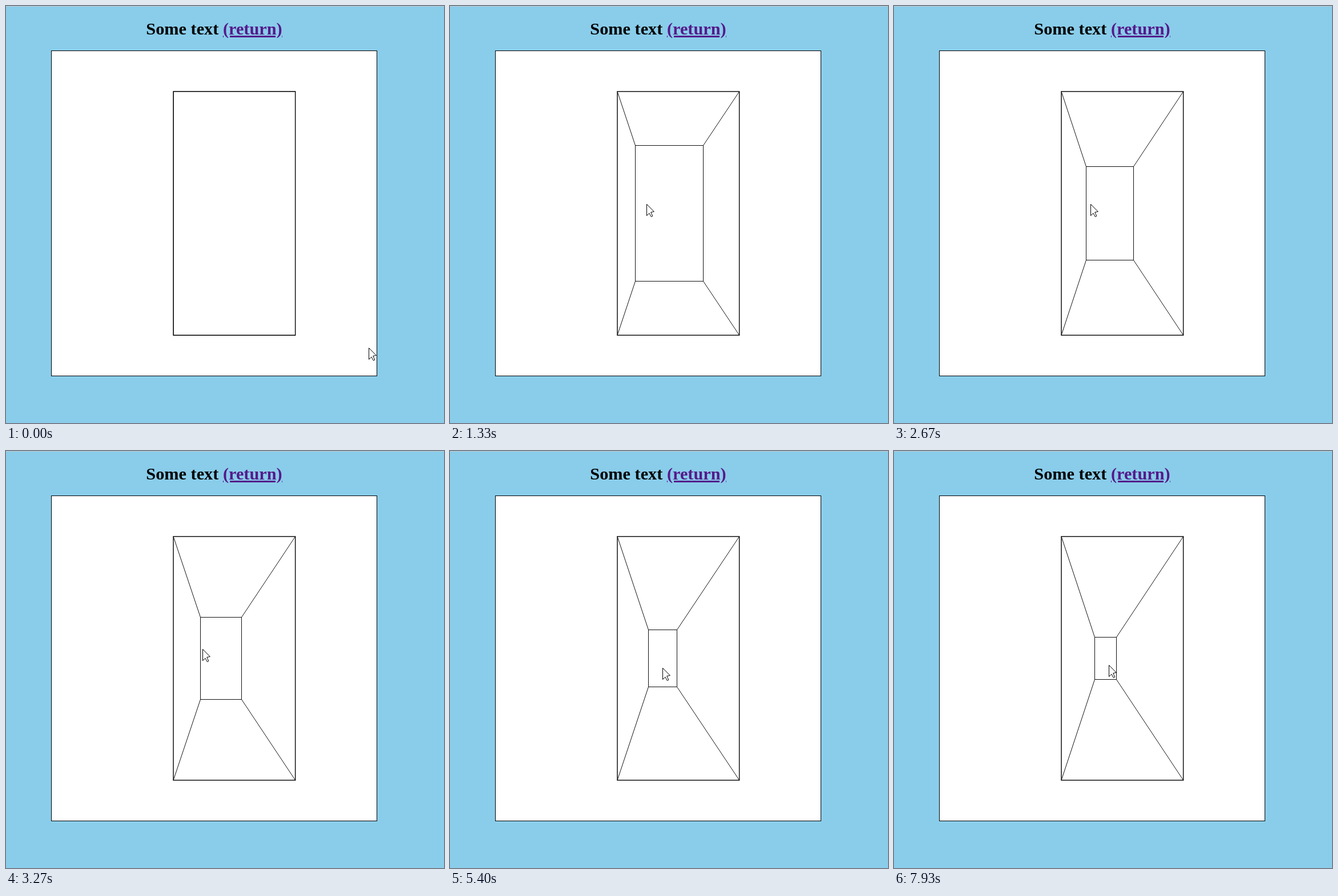
Write an HTML page with a canvas that moves like this. It is 767 px wide and 731 px high and loops after 8000 ms.

```html
<!DOCTYPE html>
<html lang="en">
<head>
<meta charset="utf-8">
<title>Tunnel</title>
<style>
  html, body { margin: 0; width: 100%; height: 100%; overflow: hidden; }
  body { position: relative; background: #89cdea; }
  body::before { content: ""; position: absolute; inset: 0 0 auto; height: 1px; background: #c3c7c9; }
  h1 {
    position: absolute; left: 79px; top: 23px; width: 571px; margin: 0;
    font: bold 30.3px "Liberation Serif", serif; text-align: center; white-space: nowrap;
  }
  h1 span { color: #551a8b; text-decoration: underline; }
  .panel {
    position: absolute; left: 79px; top: 78px; width: 571px; height: 571px;
    box-sizing: border-box; border: 1px solid #000; background: #fff;
  }
  canvas { position: absolute; left: 0; top: 0; }
</style>
</head>
<body>
<h1>Some text <span>(return)</span></h1>
<div class="panel"></div>
<canvas id="stage" width="767" height="731"></canvas>
<script>
const ctx = document.getElementById("stage").getContext("2d");
const LOOP = 8000, FPS = 15, STEPS = LOOP / 1000 * FPS;
const EYE = { x: 364.25, y: 363.5 };
const UNIT = 71.2; // the opening is 3 units wide and 6 high
const ARROW = new Path2D("M.5 .5V20.5L5 16.2 8.3 22.5 10.8 21.3 7.8 14.5 13.3 13.5Z");

// The opening as seen in perspective at a given depth.
function opening(depth) {
  const u = UNIT / depth;
  return { left: EYE.x - u, right: EYE.x + 2 * u, top: EYE.y - 3 * u, bottom: EYE.y + 3 * u };
}

function snap(box) {
  return Object.fromEntries(Object.entries(box).map(([k, v]) => [k, Math.floor(v) + 0.5]));
}

function strokeBox(box, width) {
  ctx.lineWidth = width;
  ctx.strokeRect(box.left, box.top, box.right - box.left, box.bottom - box.top);
}

// Smooth progress from 0 to 1 during the 600 ms after start.
function glide(time, start) {
  const p = Math.min(1, Math.max(0, (time - start) / 600));
  return p * p * (3 - 2 * p);
}

// The pointer sweeps into the tunnel, then drifts down and settles.
function pointerAt(time) {
  const sweep = glide(time, 0), drift = glide(time, 3600), settle = glide(time, 7200);
  return [
    Math.round(635 - 291 * sweep + 28 * drift + 4 * settle),
    Math.round(599 - 252 * sweep + 33 * drift - 5 * settle)
  ];
}

function drawTunnel(depth) {
  const near = opening(1), far = snap(opening(depth));
  ctx.strokeStyle = "#111";
  strokeBox(near, 1.5);
  strokeBox(far, 1);
  ctx.beginPath();
  for (const side of ["left", "right"]) {
    for (const edge of ["top", "bottom"]) {
      ctx.moveTo(near[side], near[edge]);
      ctx.lineTo(far[side], far[edge]);
    }
  }
  ctx.stroke();
}

function drawPointer([x, y]) {
  ctx.save();
  ctx.translate(x, y);
  ctx.fillStyle = "#fff";
  ctx.strokeStyle = "#000";
  ctx.fill(ARROW);
  ctx.stroke(ARROW);
  ctx.restore();
}

function draw(elapsed) {
  // frame times are rounded to 10 ms, so each may come a little early
  const step = Math.floor((elapsed % LOOP + 4) * FPS / 1000) % STEPS;
  ctx.clearRect(0, 0, 767, 731);
  drawTunnel(Math.max(1, 0.99 + 0.04 * step));
  drawPointer(pointerAt(step * 1000 / FPS));
}

const start = performance.now();
function tick() {
  draw(performance.now() - start);
  requestAnimationFrame(tick);
}
tick();
</script>
</body>
</html>
```
